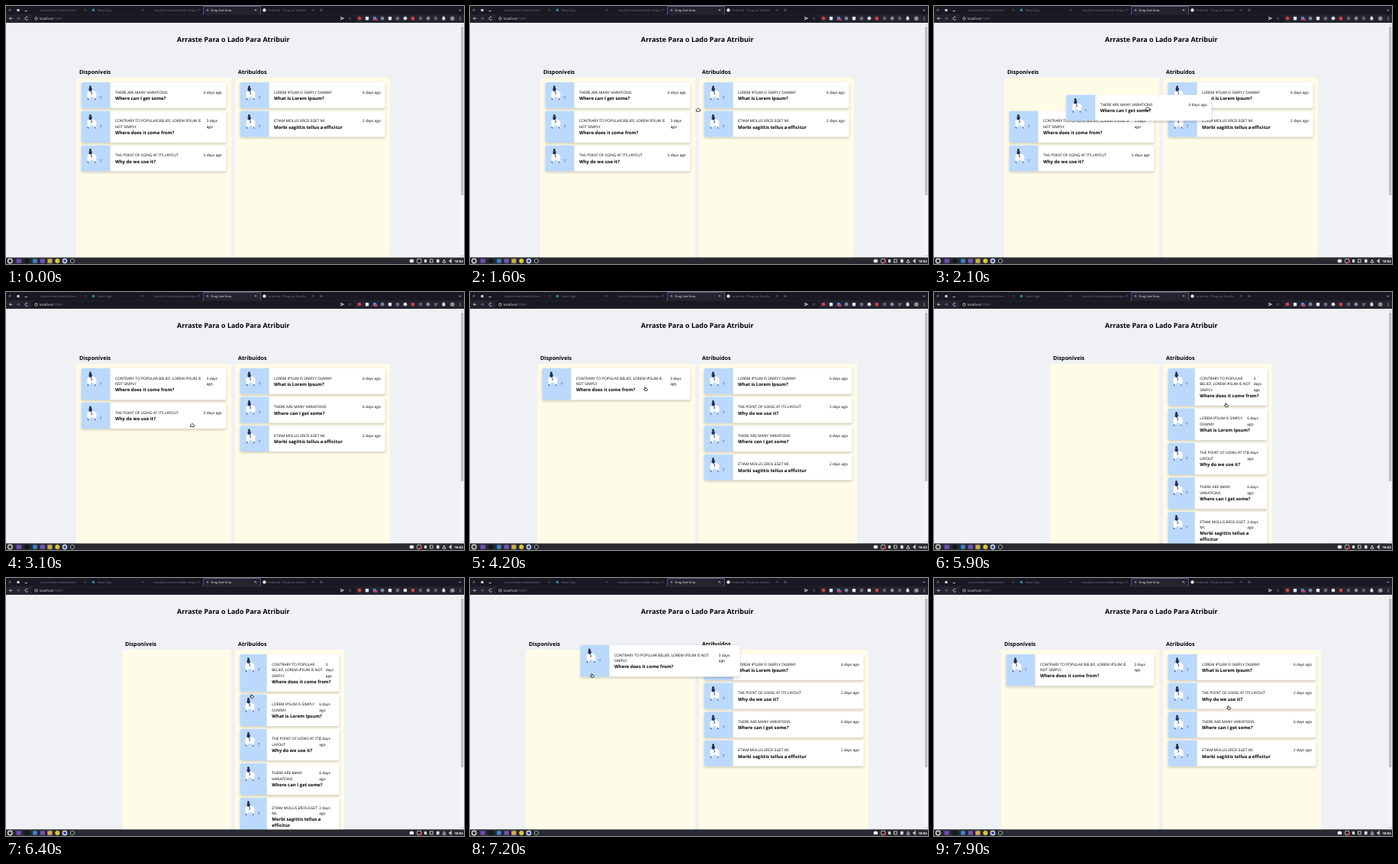
An HTML page with a canvas that plays this animation: 600 by 338 pixels, repeating every 8000 ms.

```html
<!DOCTYPE html>
<html lang="pt">
<head>
<meta charset="utf-8">
<title>Drag And Drop</title>
<style>
html, body { margin: 0; width: 100%; height: 100%; overflow: hidden; background: #eff1f5; }
canvas { display: block; width: 100vw; height: 100vh; }
</style>
</head>
<body>
<canvas id="stage" width="600" height="338"></canvas>
<script>
const ctx = document.getElementById('stage').getContext('2d');
const LOOP = 8000, STEP = 100;
const PAGE_TOP = 22, PAGE_BOTTOM = 329.5;
const FONT = '"Open Sans", "Noto Sans", sans-serif';

// Caption line breaks: [regular, wide, narrow] columns
const cards = {
  where: { caps: ['THERE ARE MANY VARIATIONS', , 'THERE ARE MANY|VARIATIONS'],
    title: 'Where can I get some?', date: '6 days ago' },
  contrary: { caps: ['CONTRARY TO POPULAR BELIEF, LOREM IPSUM IS|NOT SIMPLY',
      'CONTRARY TO POPULAR BELIEF, LOREM IPSUM IS NOT|SIMPLY',
      'CONTRARY TO POPULAR|BELIEF, LOREM IPSUM IS NOT|SIMPLY'],
    title: 'Where does it come from?', date: '3 days|ago', narrowDate: '3|days|ago' },
  why: { caps: ['THE POINT OF USING AT ITS LAYOUT', , 'THE POINT OF USING AT ITS|LAYOUT'],
    title: 'Why do we use it?', date: '2 days ago' },
  lorem: { caps: ['LOREM IPSUM IS SIMPLY DUMMY', , 'LOREM IPSUM IS SIMPLY|DUMMY'],
    title: 'What is Lorem Ipsum?', date: '6 days ago' },
  etiam: { caps: ['ETIAM MOLLIS EROS EGET MI.', , 'ETIAM MOLLIS EROS EGET|MI.'],
    title: 'Morbi sagittis tellus a efficitur', narrowTitle: 'Morbi sagittis tellus a|efficitur',
    date: '2 days ago' }
};

const lists = [
  [['where', 'contrary', 'why'], ['lorem', 'etiam']],
  [['contrary', 'why'], ['lorem', 'where', 'etiam']],
  [['contrary'], ['lorem', 'why', 'where', 'etiam']],
  [[], ['contrary', 'lorem', 'why', 'where', 'etiam']]
];

// Columns widen while a card hovers over its new list
const phases = [
  { t: 0, w: 203, order: lists[0] },
  { t: 2200, w: 222, order: lists[1] },
  { t: 2800, w: 203, order: lists[1] },
  { t: 3400, w: 222, order: lists[2] },
  { t: 4000, w: 207, order: lists[2] },
  { t: 5200, w: 222, order: lists[3] },
  { t: 5700, w: 143, order: lists[3] },
  { t: 7000, w: 222, order: lists[2] },
  { t: 7400, w: 207, order: lists[2] }
];

const drags = [
  { id: 'where', lift: 1800, drop: 2600, settle: 2800 },
  { id: 'why', lift: 3200, drop: 3800, settle: 4000 },
  { id: 'contrary', lift: 4400, drop: 5200, settle: 5400 },
  { id: 'contrary', lift: 6600, drop: 7200, settle: 7400 }
];

const path = [
  [800, 458, 62], [1100, 160, 126], [1400, 299, 136], [1600, 299, 136],
  [1800, 205, 118], [2500, 395, 160], [2700, 395, 160], [3100, 244, 174.5],
  [3200, 244, 174.5], [3700, 420, 165], [3800, 420, 165], [4200, 230, 127],
  [4400, 230, 127], [5200, 400, 128], [5400, 419, 125], [6000, 380, 150],
  [6400, 322, 155], [6600, 322, 140], [6900, 92, 140], [7200, 160, 128],
  [7800, 320, 122], [7900, 386, 170]
];

const clamp = v => Math.max(0, Math.min(1, v));
const ease = v => { v = clamp(v); return v * v * (3 - 2 * v); };
const mix = (a, b, k) => a + (b - a) * k;

function rect(x, y, w, h, color, r = 0) {
  ctx.fillStyle = color;
  ctx.beginPath();
  ctx.roundRect(x, y, w, h, r);
  ctx.fill();
}

function dot(x, y, r, color) {
  ctx.fillStyle = color;
  ctx.beginPath();
  ctx.arc(x, y, r, 0, 7);
  ctx.fill();
}

function line(color, width, ...pts) {
  ctx.strokeStyle = color;
  ctx.lineWidth = width;
  ctx.beginPath();
  for (let i = 0; i < pts.length; i += 2) ctx.lineTo(pts[i], pts[i + 1]);
  ctx.stroke();
}

// Set large and scaled down, so small type keeps fractional advances
function text(str, x, y, size, color = '#000', weight = 400, align = 'left') {
  ctx.save();
  ctx.translate(x, y);
  ctx.scale(.1, .1);
  ctx.font = `${weight} ${size * 10}px ${FONT}`;
  ctx.textAlign = align;
  ctx.fillStyle = color;
  ctx.fillText(str, 0, 0);
  ctx.restore();
}

function content(id, w) {
  const card = cards[id], narrow = w < 160;
  const cap = narrow ? card.caps[2] : w > 215 && card.caps[1] || card.caps[0];
  const title = narrow && card.narrowTitle || card.title;
  const date = narrow ? card.narrowDate || card.date.replace(' ago', '|ago') : card.date;
  return { narrow, cap: cap.split('|'), title: title.split('|'), date: date.split('|') };
}

function layout({ w, order }) {
  const slots = {};
  order.forEach((list, side) => {
    let y = 100;
    for (const id of list) {
      const c = content(id, w);
      const h = 33.8 + 7.5 * (c.cap.length + c.title.length - 2);
      slots[id] = { ...c, x: side ? 306.7 : 301.6 - w, y, w: w - 13, h };
      y += h + 3.8;
    }
  });
  return slots;
}

const phaseAt = t => phases.findLastIndex(p => p.t <= t);

function cursorAt(t) {
  const i = path.findLastIndex(p => p[0] <= t);
  if (i < 0) return null;
  const a = path[i], b = path[i + 1] || a;
  const k = ease((t - a[0]) / (b[0] - a[0] || 1));
  return { x: mix(a[1], b[1], k), y: mix(a[2], b[2], k) };
}

function slotsAt(t) {
  const i = phaseAt(t), phase = phases[i], prev = phases[i - 1];
  const slots = layout(phase);
  if (prev && prev.order !== phase.order) {
    const old = layout(prev), k = ease((t - phase.t) / 200);
    for (const id in slots) slots[id].y = mix(old[id].y, slots[id].y, k);
  }
  const drag = drags.find(d => t >= d.lift && t < d.settle);
  if (drag) {
    const home = layout(phases[phaseAt(drag.lift)])[drag.id];
    const grab = cursorAt(drag.lift), now = cursorAt(Math.min(t, drag.drop));
    const target = layout(phase)[drag.id], slot = slots[drag.id];
    const k = ease((t - drag.drop) / (drag.settle - drag.drop));
    slot.x = mix(home.x + now.x - grab.x, target.x, k);
    slot.y = mix(home.y + now.y - grab.y, target.y, k);
  }
  return { slots, phase, drag };
}

function drawRider(x, y) {
  const white = '#fcfcfe', navy = '#2b2d49';
  ctx.fillStyle = white;
  ctx.beginPath();
  ctx.ellipse(x + 14, y + 14.8, 6, 4.2, .1, 0, 7);
  ctx.fill();
  rect(x + 8, y + 12, 4, 9, white, 1.5);
  rect(x + 16, y + 14, 3.6, 7.4, white, 1.2);
  rect(x + 10, y + 7, 4, 4.4, navy, 1.2);
  dot(x + 11.8, y + 5.8, 1.4, '#1f2038');
  line(navy, .9, x + 12, y + 11, x + 13.8, y + 13.5, x + 13.2, y + 16);
  line(navy, 1, x + 8.6, y + 20.8, x + 9.2, y + 23);
  line(navy, 1, x + 17.8, y + 20.8, x + 18.4, y + 22.8);
  line('#6d8fb3', .8, x + 24, y + 19.2, x + 27, y + 18.8);
  line('#6d8fb3', .7, x + 25.8, y + 19, x + 25.5, y + 22.2);
}

function drawCard(s) {
  const { x, y, w, h } = s, image = s.narrow ? 35 : 38;
  const right = x + w, tx = x + (s.narrow ? 41.5 : 44.3);
  ctx.save();
  ctx.shadowColor = 'rgba(0,0,0,.2)';
  ctx.shadowBlur = 3.5;
  ctx.shadowOffsetY = 1.6;
  rect(x, y, w, h, '#fff', 2);
  ctx.restore();
  rect(x, y, image, h, '#bad9fc', [2, 0, 0, 2]);
  drawRider(x - (s.narrow ? 1 : 0), y);
  s.cap.forEach((row, i) => text(row, tx, y + 14.6 + i * 7.5, 4.9, '#000', 500));
  if (s.date.length === 1) text(s.date[0], right - 5.8, y + 14.6, 4.85, '#000', 500, 'right');
  else {
    const inset = s.narrow ? 34.8 - 8.4 * (s.date.length - 1) : 6 + w * .105;
    s.date.forEach((row, i) => text(row, right - inset, y + 14.6 + i * 7.5, 4.85, '#000', 500));
  }
  const ty = y + 15.4 + s.cap.length * 7.5;
  s.title.forEach((row, i) => text(row, tx, ty + i * 7.5, 5.97, '#000', 700));
}

function drawPage(t) {
  const { slots, phase, drag } = slotsAt(t), { w } = phase;
  const height = PAGE_BOTTOM - PAGE_TOP;
  rect(0, PAGE_TOP, 600, height, '#eff1f5');
  text('Arraste Para o Lado Para Atribuir', 297.8, 46.5, 8.93, '#000', 700, 'center');
  text('Disponíveis', 299 - w, 89, 7.2, '#000', 700);
  text('Atribuídos', 304, 89, 7.2, '#000', 700);
  rect(295 - w, 94, w, PAGE_BOTTOM - 94, '#fefbe7');
  rect(300, 94, w, PAGE_BOTTOM - 94, '#fefbe7');
  for (const id in slots) if (!drag || id !== drag.id) drawCard(slots[id]);
  if (drag) drawCard(slots[drag.id]);
  rect(595, PAGE_TOP, 5, height, '#f4f4f4');
  rect(596, 27, 3.2, 221, '#c0c0c2');
  line('#777', .6, 596.5, 25.4, 597.6, 24.2, 598.7, 25.4);
  line('#777', .6, 596.5, 326.6, 597.6, 327.8, 598.7, 326.6);
}

function drawCross(x, y, color) {
  line(color, .6, x - 1.1, y - 1.1, x + 1.1, y + 1.1);
  line(color, .6, x + 1.1, y - 1.1, x - 1.1, y + 1.1);
}

function drawBrowser() {
  const dim = '#74758a', pale = '#dcdce4', dark = '#181922', bar = '#23242f';
  rect(0, 0, 600, 11, dark);
  rect(258, 0, 76, 11, '#7c66ad', [2, 2, 0, 0]);
  rect(258.6, .8, 74.8, 10.2, bar, [1.5, 1.5, 0, 0]);
  drawCross(5, 5.3, pale);
  rect(14.5, 4, 3, 3, pale);
  line(pale, .8, 24.5, 6.5, 28, 6.5);
  const tabs = [['classes/react-beautiful-dn', 45, 104], ['React App', 120, 179],
    ['beautiful and accessible drag a', 194, 253], ['Drag And Drop', 268.5, 327],
    ['lumbrela - Pesquisa Nuvelo', 343, 402]];
  tabs.forEach(([label, x, close], i) => {
    const color = i === 3 ? '#f2f2f6' : dim;
    text(label, x, 6.8, 3.9, color, 500);
    drawCross(close, 5.3, color);
  });
  dot(114.5, 5.4, 1.9, '#2f7e99');
  dot(264, 5.4, 1.4, '#7a63b5');
  dot(338.5, 5.4, 2.2, '#efe3d6');
  line(dim, .7, 411, 5.4, 415, 5.4);
  line(dim, .7, 413, 3.4, 413, 7.4);
  line(pale, .8, 593.5, 4.8, 595, 6.2, 596.5, 4.8);

  rect(0, 11, 600, PAGE_TOP - 11, bar);
  rect(33, 11.8, 425, 9, dark, 4.5);
  line(pale, .8, 8.5, 16.3, 4.5, 16.3);
  line(pale, .8, 6.3, 14.5, 4.5, 16.3, 6.3, 18.1);
  line(dim, .8, 14, 16.3, 18, 16.3);
  line(dim, .8, 16.2, 14.5, 18, 16.3, 16.2, 18.1);
  ctx.strokeStyle = pale;
  ctx.lineWidth = .8;
  ctx.beginPath();
  ctx.arc(27, 16.3, 2, .5, 5.6);
  ctx.stroke();
  ctx.beginPath();
  ctx.arc(39.5, 16.4, 1.7, 0, 7);
  ctx.stroke();
  text('localhost', 44, 17.8, 4.4, '#f2f2f6', 500);
  text(':3000', 62.8, 17.8, 4.4, dim);
  line(pale, .9, 438.5, 14.5, 442.5, 16.2, 438.5, 17.9, 439.3, 16.2, 438.5, 14.5);
  text('☆', 450.5, 18.2, 5.5, pale, 400, 'center');
  const extras = ['#d23b45', '#e4e4ea', '#4f7fd0', '#858694', '#e6e6ec', '#6b6c7a',
    '#dcdce2', '#c94048', '#5a5b68', '#8a8b98', '#5a5b68'];
  extras.forEach((color, i) => {
    const x = 463 + i * 10;
    if (i % 3) rect(x - 2.2, 14, 4.4, 4.4, color, .8);
    else dot(x, 16.2, 2.4, color);
  });
  rect(483, 16.3, 3.5, 2.7, '#e23b46', .5);
  rect(571.5, 14.6, 3.8, 3.8, pale, .6);
  dot(573.4, 14.3, 1, pale);
  dot(584.8, 16.2, 2.8, '#9c8d88');
  for (let i = -1; i < 2; i++) dot(595, 16.2 + i * 1.7, .55, pale);
}

function drawTaskbar(t) {
  const pale = '#dedee2';
  rect(0, PAGE_BOTTOM, 600, 338 - PAGE_BOTTOM, '#292a2f');
  dot(5.3, 334, 3.4, '#e8e8e8');
  dot(5.3, 334, 2.2, '#3a3b40');
  rect(13.5, 331.3, 6.5, 5.4, '#704bb5', .7);
  rect(24.5, 331.3, 6, 5.4, '#15161b', .7);
  rect(35.2, 331.3, 5.6, 5.4, '#3c83cf', .7);
  rect(44.8, 331.3, 6.2, 5.4, '#7650bd', .7);
  rect(54, 330.8, 7, 6.6, '#6a6b70');
  dot(57.4, 334, 2.7, '#d7b13c');
  dot(67.3, 334, 3, '#e5c332');
  dot(77, 334, 3.2, '#eef0fa');
  dot(77, 334, 2.1, '#344bb0');
  dot(87, 334, 2.8, '#d9d9dc');
  dot(87, 334, 2.2, '#202126');
  rect(528.7, 331.8, 5.5, 4.4, '#e9e9ee', 1.8);
  dot(541.3, 334, 3.2, '#dcdce0');
  dot(541.3, 334, 2.5, '#222329');
  if (t >= 200) dot(542.8, 335.4, 1.7, '#df2935');
  rect(548, 332, 3, 4, pale, .5);
  ctx.strokeStyle = pale;
  ctx.lineWidth = .8;
  ctx.strokeRect(555.5, 332, 3.6, 3.8);
  rect(564, 331.8, 3.6, 4.4, pale, 1);
  line(pale, .9, 572, 336, 574, 332, 576, 336);
  line(pale, .9, 572, 336, 576, 336);
  line(pale, 1.2, 580, 334, 581.5, 334, 583, 332.3, 583, 335.7, 581.5, 334);
  text('18:52', 587.6, 335.7, 4.3, '#fff', 700);
}

function drawCursor(t) {
  const at = cursorAt(t);
  if (!at) return;
  const held = drags.some(d => t >= d.lift && t < d.drop);
  const fist = held || t >= 1100 && t < 3200;
  ctx.save();
  ctx.translate(at.x, at.y);
  ctx.beginPath();
  if (fist) {
    ctx.moveTo(-2.3, 2);
    ctx.quadraticCurveTo(-3.4, -.6, -1.8, -.6);
    ctx.quadraticCurveTo(-.3, -3, 1.2, -1.4);
    ctx.quadraticCurveTo(3.4, -1, 2.3, 2);
  } else {
    ctx.moveTo(-1.2, 2.2);
    ctx.lineTo(-2.3, .3);
    ctx.lineTo(-1, .5);
    ctx.lineTo(-1.2, -2.2);
    ctx.quadraticCurveTo(-.4, -3, .1, -2);
    ctx.lineTo(.2, -.6);
    ctx.quadraticCurveTo(2.8, -.6, 2.6, .7);
    ctx.lineTo(2, 2.2);
  }
  ctx.closePath();
  ctx.fillStyle = '#fff';
  ctx.fill();
  ctx.strokeStyle = '#222';
  ctx.lineWidth = .85;
  ctx.lineJoin = 'round';
  ctx.stroke();
  ctx.restore();
}

const start = performance.now();

function frame(now) {
  const t = Math.floor(Math.max(0, now - start) % LOOP / STEP) * STEP;
  ctx.textRendering = 'geometricPrecision';
  drawPage(t);
  drawBrowser();
  drawTaskbar(t);
  drawCursor(t);
  requestAnimationFrame(frame);
}
requestAnimationFrame(frame);
</script>
</body>
</html>
```
